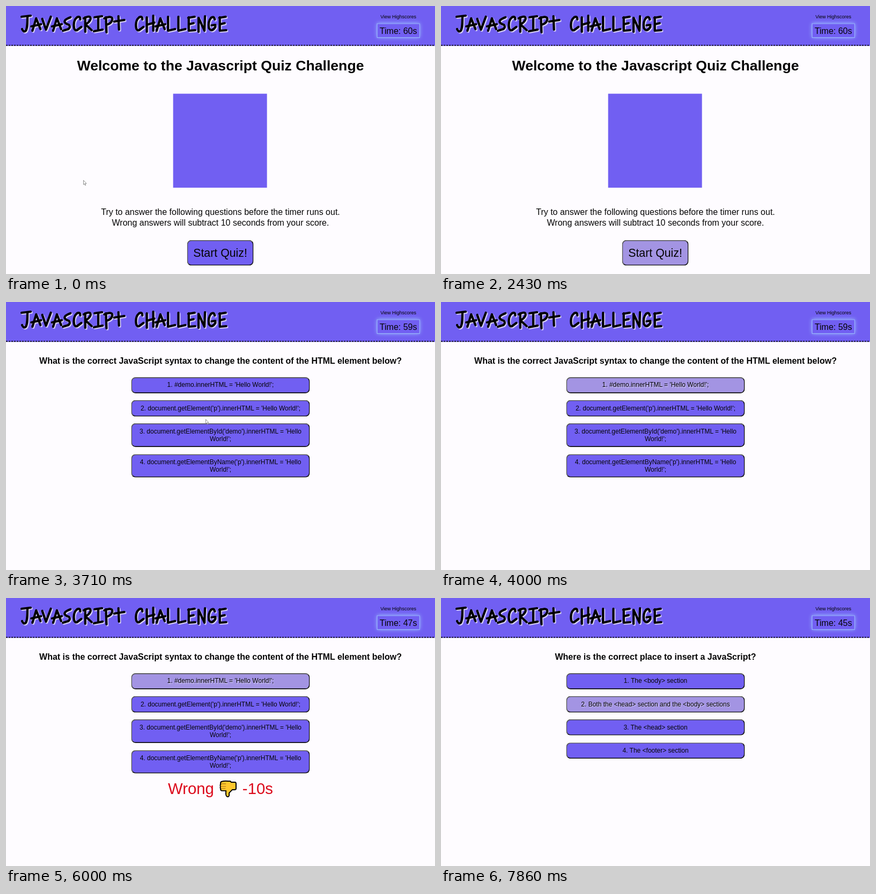
Recreate the animation shown at these times as an HTML page. Size 800 by 499 pixels, loop 8000 ms.

```html
<!DOCTYPE html>
<html lang="en">
<head>
<meta charset="utf-8">
<title>JavaScript Challenge</title>
<style>
  html, body { margin: 0; width: 100%; height: 100%; overflow: hidden; background: #fefcff; }
  /* The page is laid out 960px wide and shown at 800px. */
  #page { position: absolute; width: 960px; height: 599px; transform: scale(.83333); transform-origin: 0 0;
    font-family: "Liberation Sans", Arial, sans-serif; color: #050505; }
  header { position: absolute; width: 100%; height: 89px; background: #715ff2; }
  header::after { content: ""; position: absolute; left: 0; bottom: 0; width: 100%; height: 1.8px;
    background: repeating-linear-gradient(90deg, #000 0 4px, #715ff2 4px 6px); }
  header svg { position: absolute; left: 0; top: 0; width: 960px; height: 88.8px; overflow: visible;
    fill: none; stroke: #000; stroke-width: 4.2; stroke-linecap: round; stroke-linejoin: round;
    filter: drop-shadow(2px 2px .6px #e0dafa); }
  #scores { position: absolute; left: 830px; width: 96px; top: 17px; text-align: center; font-size: 10.8px; line-height: 14px; }
  #timer { position: absolute; left: 830px; top: 39px; width: 94px; height: 30px; border: 1.2px solid #a5d5ff;
    box-shadow: 0 0 9px #9fc8ff; text-align: center; font-size: 19.2px; line-height: 31px; }
  .line { position: absolute; left: 0; width: 100%; text-align: center; transform: translateY(-50%); white-space: nowrap; }
  h1 { margin: 0; top: 132.6px; font-size: 31.95px; }
  h2 { margin: 0; top: 132px; font-size: 19.2px; }
  #emblem { position: absolute; left: 374.4px; top: 195.6px; width: 210px; height: 210px; background: #715ff2; }
  #intro p { margin: 0; font-size: 19.2px; }
  button { box-sizing: border-box; display: block; padding: 0; font: inherit; color: inherit;
    background: #715ff2; border: 2px solid; border-color: #555 #111 #111 #555; border-radius: 10px; }
  button.hover { background: #a394e3; }
  #start { position: absolute; left: 405px; top: 523px; width: 149px; height: 57px; font-size: 25.6px; }
  #answers { position: absolute; left: 280px; top: 167.6px; width: 400px; }
  #answers button { width: 400px; margin-bottom: 15.6px; padding: 7.8px 14px; font-size: 14.4px; line-height: 16.6px; }
  #answers .hover { text-shadow: 1.5px 1.5px 1px #cfc8f2; }
  #wrong { top: 426px; font-size: 35.2px; color: #dc0b1c; }
  #wrong svg { width: 38px; height: 40px; margin: 0 3px; vertical-align: -9px; }
  #cursor { position: absolute; left: 0; top: 0; width: 7px; height: 11px; overflow: visible; }
</style>
</head>
<body>
<div id="page">
  <header>
    <svg id="lettering" viewBox="0 0 800 74" role="img" aria-label="JavaScript Challenge"></svg>
    <div id="scores">View Highscores</div>
    <div id="timer"></div>
  </header>
  <section id="intro">
    <h1 class="line">Welcome to the Javascript Quiz Challenge</h1>
    <div id="emblem"></div>
    <p class="line" style="top:460.8px">Try to answer the following questions before the timer runs out.</p>
    <p class="line" style="top:484.8px">Wrong answers will subtract 10 seconds from your score.</p>
    <button id="start">Start Quiz!</button>
  </section>
  <section id="quiz">
    <h2 class="line" id="question"></h2>
    <div id="answers"><button></button><button></button><button></button><button></button></div>
    <div class="line" id="wrong">Wrong
      <svg viewBox="0 0 32 33"><path d="M3 3Q9 1 16 2H20L22 4H29Q31 4 31 7V16Q31 18 28 18H24L18 24V29Q17 32 14 31Q11 30 12 20H4Q1 19 2 16Q0 14 2 12Q0 9 2 8Q1 5 3 3Z" fill="#ffc72e" stroke="#000" stroke-width="2" stroke-linejoin="round"/><path d="M3 7H12M2 12H12M3 16H11" fill="none" stroke="#b8821a" stroke-width="1.3"/></svg>
      -10s</div>
  </section>
</div>
<svg id="cursor" viewBox="0 0 7 11"><path d="M.5.5V8.5L2.3 7L3.6 10L4.8 9.5L3.6 6.5H6Z" fill="#fff" stroke="#777" stroke-width=".8"/></svg>
<script>
const LOOP = 8000, STEP = 1000 / 7;
const START = 2500, WRONG = 4700, NEXT = 6200;

const $ = id => document.getElementById(id);
const show = (element, visible) => element.style.display = visible ? '' : 'none';

const glyphs = {
  J: 'M1 3L18 1M12 2C12 14 12 24 9 29Q5 33 2 26',
  A: 'M2 29L9 6L17 26M0 21L18 17',
  V: 'M1 7L8 27L17 3',
  S: 'M15 4Q4 8 4 12Q5 16 12 18Q16 22 11 26L1 29',
  C: 'M14 8Q14 1 8 4Q2 9 2 18Q2 30 8 28L16 22',
  R: 'M4 4V31M1 6Q14 -1 14 7Q12 14 4 17L16 28',
  I: 'M2 4L16 2M9 3V28M1 30L17 27',
  P: 'M4 4L5 32M1 6Q16 0 16 8Q14 16 5 18',
  t: 'M8 2L9 27M0 12L19 9',
  H: 'M3 4V31M15 1V29M3 18L17 14',
  L: 'M4 3V29L17 26',
  E: 'M4 4V29L16 28M3 5L15 3M4 17L13 15',
  N: 'M3 31V5L14 29L15 2',
  G: 'M14 8Q12 1 7 5Q1 12 3 24Q8 33 15 22V18L8 19',
  ' ': ''
};
$('lettering').innerHTML = [...'JAVASCRIPt CHALLENGE']
  .map((c, i) => `<path d="${glyphs[c]}" transform="translate(${28 + 19.3 * i} 17)"/>`).join('');

const questions = [
  ['What is the correct JavaScript syntax to change the content of the HTML element below?',
    "#demo.innerHTML = 'Hello World!';",
    "document.getElement('p').innerHTML = 'Hello World!';",
    "document.getElementById('demo').innerHTML = 'Hello World!';",
    "document.getElementByName('p').innerHTML = 'Hello World!';"],
  ['Where is the correct place to insert a JavaScript?',
    'The <body> section',
    'Both the <head> section and the <body> sections',
    'The <head> section',
    'The <footer> section']
];

// Pointer path: time, x, y
const path = [
  [0, 144, 324], [140, 144, 324], [1100, 372, 456], [2800, 372, 456], [3140, 372, 390],
  [3430, 372, 316], [3900, 372, 154], [7300, 372, 154], [7560, 372, 197], [LOOP, 372, 197]
];

function pointerAt(t) {
  const i = path.findIndex((p, k) => k > 0 && t <= p[0]);
  const [t0, x0, y0] = path[i - 1], [t1, x1, y1] = path[i];
  const u = (t - t0) / (t1 - t0);
  return [x0 + (x1 - x0) * u, y0 + (y1 - y0) * u];
}

const buttons = [...document.querySelectorAll('button')];
const answers = [...$('answers').children];
let shownQuestion;

function setQuestion(index) {
  if (index === shownQuestion) return;
  shownQuestion = index;
  const [title, ...options] = questions[index];
  $('question').textContent = title;
  options.forEach((text, i) => answers[i].textContent = `${i + 1}. ${text}`);
}

function render(t) {
  const playing = t >= START;
  show($('intro'), !playing);
  show($('quiz'), playing);
  show($('wrong'), t >= WRONG && t < NEXT);
  setQuestion(t < NEXT ? 0 : 1);

  // The clock starts at 2.6 s; the penalty shows on the first tick after a wrong answer.
  const ticks = Math.max(0, Math.floor((t - 2600) / 1000));
  $('timer').textContent = `Time: ${60 - ticks - (ticks > 2 ? 10 : 0)}s`;

  const [x, y] = pointerAt(t);
  let hovering = false;
  for (const button of buttons) {
    const box = button.getBoundingClientRect();
    const inside = x > box.left && x < box.right && y > box.top && y < box.bottom;
    button.classList.toggle('hover', inside);
    hovering ||= inside;
  }
  show($('cursor'), !hovering);
  $('cursor').style.transform = `translate(${x}px, ${y}px)`;
}

const begin = performance.now();
function frame() {
  const t = (performance.now() - begin) % LOOP;
  render(Math.min(LOOP, Math.floor((t + 6) / STEP) * STEP));
  requestAnimationFrame(frame);
}
frame();
</script>
</body>
</html>
```
